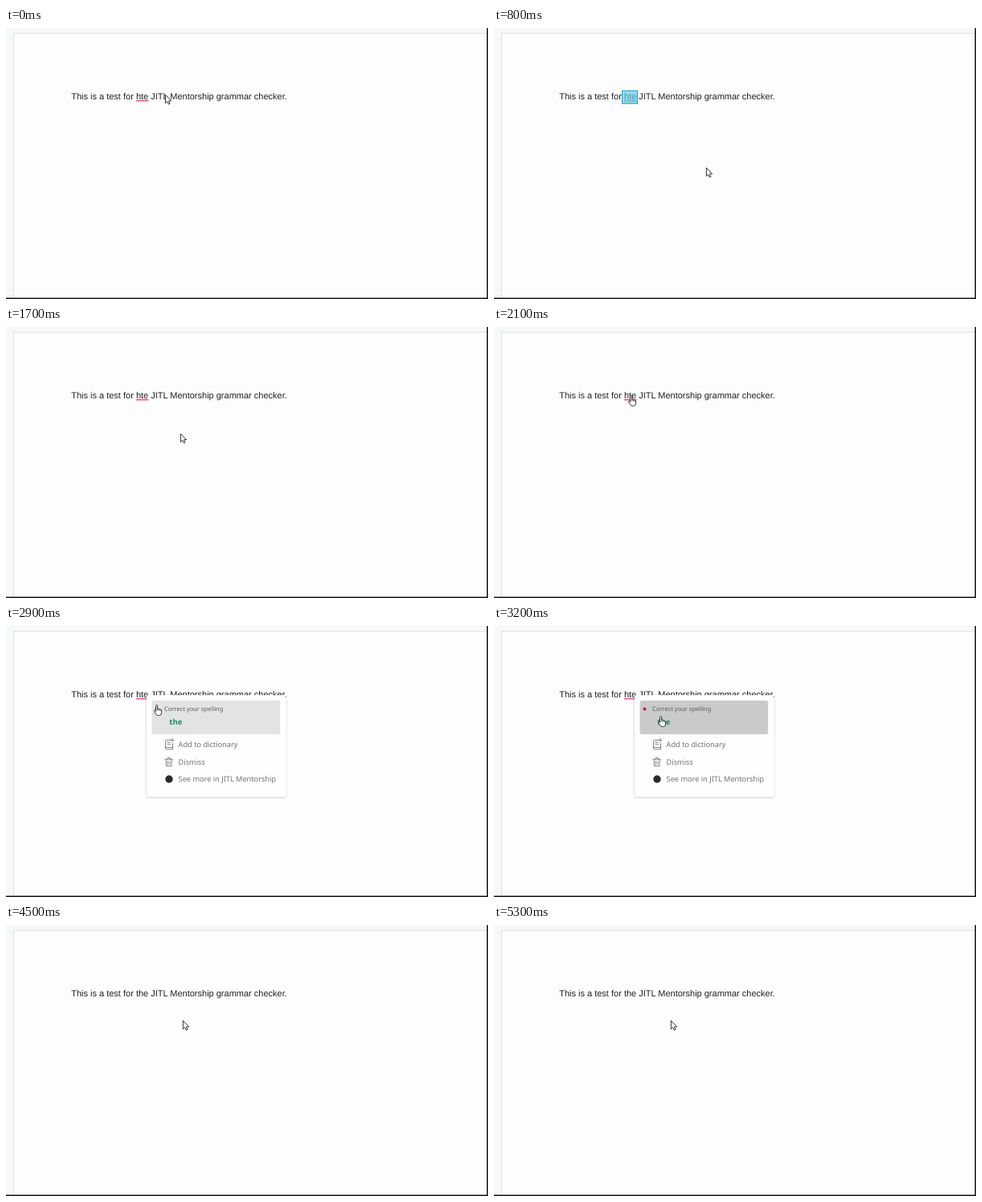
An HTML page that plays this animation: 600x338 px, repeating every 6800 ms.

```html
<!DOCTYPE html>
<html lang="en">
<head>
<meta charset="utf-8">
<title>Grammar checker</title>
<style>
  html, body { margin: 0; width: 100%; height: 100%; overflow: hidden; background: #f7f9f8; }
  svg { display: block; width: 100vw; height: 100vh; }
  text { text-rendering: geometricPrecision; white-space: pre; }
  .doc { font: 11px "Liberation Sans", Arial, sans-serif; fill: #202020; }
  .menu { font: 9.2px "Noto Sans", sans-serif; fill: #6c737b; }
  .menu .title { font-size: 7.5px; fill: #555d65; }
  .menu .fix { font-size: 9.5px; font-weight: 700; fill: #168a6c; }
  .icon { fill: none; stroke: #6c737b; stroke-width: .9; stroke-linejoin: round; stroke-linecap: round; }
  .cursor { fill: #fff; stroke: #1c1c1c; stroke-width: .9; stroke-linejoin: round; }
</style>
</head>
<body>
<svg viewBox="0 0 600 338" preserveAspectRatio="none">
  <defs>
    <filter id="soft" x="-10%" y="-10%" width="120%" height="120%">
      <feDropShadow dx="0" dy="0.6" stdDeviation="1.5" flood-color="#000" flood-opacity=".24"/>
    </filter>
  </defs>

  <rect width="600" height="338" fill="#f7f9f8"/>
  <rect x="9.5" y="6.5" width="600" height="340" fill="#fefdfe" stroke="#d8e3de"/>

  <text class="doc" x="81.2" y="89">This is a test for <tspan id="word">hte</tspan> JITL Mentorship grammar checker.</text>
  <g id="squiggle">
    <rect x="162" y="90" width="15.3" height="1.3" fill="#dc5474"/>
    <rect x="162" y="91.3" width="15.3" height="1" fill="#f0a9ba"/>
  </g>
  <rect id="flash" x="159.5" y="78.2" width="19" height="16" fill="#5fcdec" fill-opacity=".68" stroke="#1f9cc4"/>

  <g id="menu" class="menu">
    <rect x="175" y="86.3" width="173.3" height="126.7" rx="2.5" fill="#fefefe" filter="url(#soft)"/>
    <rect id="hover" x="181.5" y="93" width="159.7" height="42" rx="2.5" fill="#cacaca"/>
    <circle cx="187.5" cy="103.5" r="2" fill="#d3123b"/>
    <text class="title" x="197" y="105.7">Correct your spelling</text>
    <text class="fix" x="203.3" y="123.2">the</text>

    <g class="icon">
      <path d="M205 142.3H199.6Q198.4 142.3 198.4 143.5V152.4Q198.4 153.8 199.8 153.8H207.6V146.5M198.6 151.4H207.6M200.8 145.4H204M200.8 147.8H205M207 140.4V144.2M205.1 142.3H208.9"/>
      <path d="M198 166.2H207.4M201 166V164.4H204.4V166M199 166.4L199.6 174.8H205.8L206.4 166.4M201.5 168.6V172.6M203.9 168.6V172.6"/>
    </g>
    <circle cx="203" cy="191" r="4.7" fill="#2b292c"/>

    <text x="214.6" y="151">Add to dictionary</text>
    <text x="214.6" y="172.6">Dismiss</text>
    <text x="214.6" y="194.4">See more in JITL Mentorship</text>
  </g>

  <path id="arrow" class="cursor" d="M.4.4V10.8L2.7 8.6L4.3 12.1L6 11.4L4.5 7.9H7.6Z"/>
  <g id="hand" class="cursor">
    <path d="M2.6 8.5V1.6Q2.6.5 3.6.5T4.6 1.6V5.4Q5.7 4.7 6.3 5.8Q7.4 5.2 8 6.3Q9.6 5.8 9.6 7.6V10.2Q9.6 13.5 6.6 13.5H5.2Q3.6 13.5 2.6 11.8L.6 8.6Q.2 7.4 1.2 7.3Q2 7.2 2.6 8.5Z"/>
    <path d="M4.6 5.4V7.5M6.3 5.8V7.7M8 6.3V7.9" stroke-width=".7"/>
  </g>

  <rect x="598.5" width="1.5" height="338" fill="#111"/>
  <rect y="336.5" width="600" height="1.5" fill="#111"/>
</svg>

<script>
const LOOP = 6800, STEP = 100;

// Pointer path: [time, x, y]
const path = [
  [0, 198, 83], [100, 208, 92], [300, 252, 138], [400, 270, 158], [500, 272, 168],
  [600, 264, 174], [800, 264, 174], [1300, 251, 168], [1400, 250, 167],
  [1500, 246, 163], [1600, 234, 150], [1900, 183, 98], [2000, 173, 89], [2100, 167, 85],
  [2500, 167, 85], [2600, 171, 86], [2700, 171, 86], [2900, 184, 98], [3200, 204, 112],
  [3400, 222, 114], [3600, 234, 118], [3800, 217, 119], [4100, 220, 119], [LOOP, 220, 119]
];

const el = id => document.getElementById(id);
const clamp = v => Math.max(0, Math.min(1, v));
const show = (id, on) => { el(id).style.visibility = on ? "visible" : "hidden"; };

function pointerAt(t) {
  const i = path.findIndex(p => p[0] > t);
  const [t0, x0, y0] = path[i - 1], [t1, x1, y1] = path[i];
  const k = (t - t0) / (t1 - t0);
  return [x0 + (x1 - x0) * k, y0 + (y1 - y0) * k];
}

function draw(time) {
  const t = Math.floor((time % LOOP) / STEP) * STEP;
  const fixed = t >= 4200;
  const hand = t >= 2000 && !fixed;
  const [x, y] = pointerAt(t);

  for (const id of ["arrow", "hand"]) el(id).setAttribute("transform", `translate(${x} ${y})`);
  show("hand", hand);
  show("arrow", !hand);

  el("word").textContent = fixed ? "the" : "hte";
  show("squiggle", !fixed);
  el("flash").style.opacity = t < 800 ? 0 : clamp((1500 - t) / 700);

  const open = t >= 2600 && !fixed;
  el("menu").style.display = open ? "" : "none";
  el("hover").style.opacity = clamp((t - 2800) / 200);
}

const start = performance.now();
function tick() {
  draw(performance.now() - start);
  requestAnimationFrame(tick);
}
tick();
</script>
</body>
</html>
```
